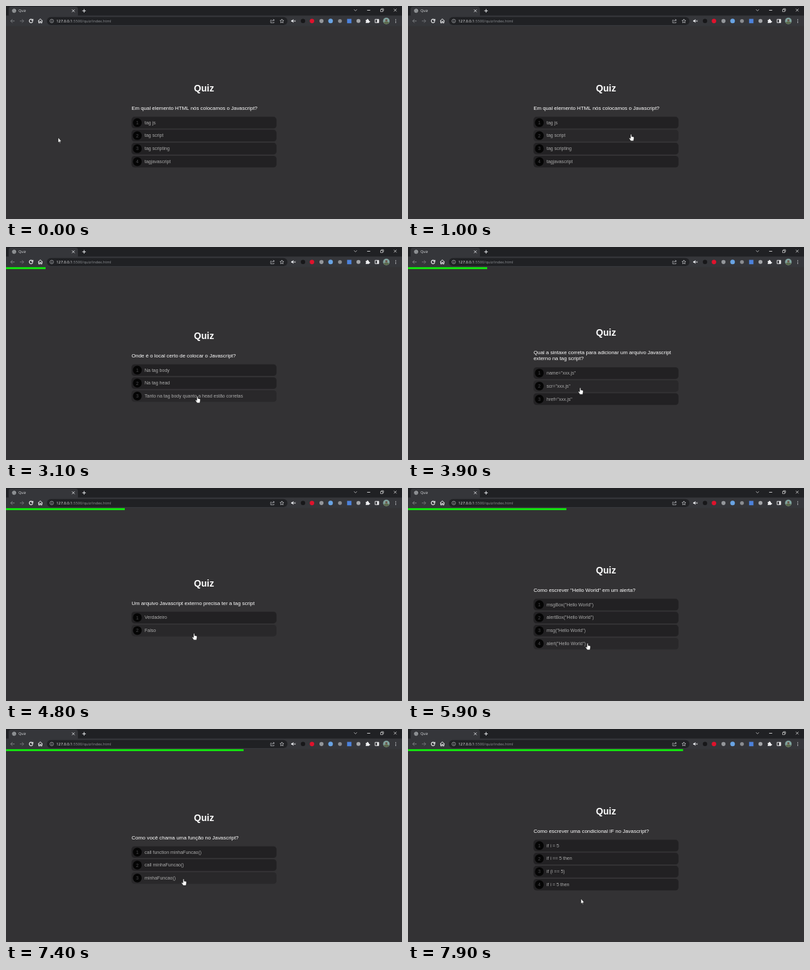
An HTML page with a canvas for the animation above (8 s loop, 600 by 324 pixels).

```html
<!DOCTYPE html>
<html lang="pt">
<head>
<meta charset="utf-8">
<title>Quiz</title>
<style>
html, body { margin: 0; width: 100%; height: 100%; overflow: hidden; background: #333234; }
canvas { display: block; width: 600px; height: 324px; }
</style>
</head>
<body>
<canvas id="stage" width="600" height="324"></canvas>
<script>
const ctx = document.getElementById('stage').getContext('2d');
const LOOP = 8000, STEP = 100, GROW = 500;
const SANS = '"Liberation Sans", Arial, sans-serif';
const UI = '"Open Sans", sans-serif';

const questions = [
  { at: 0, lines: ['Em qual elemento HTML nós colocamos o Javascript?'],
    options: ['tag js', 'tag script', 'tag scripting', 'tagjavascript'] },
  { at: 2000, lines: ['Onde é o local certo de colocar o Javascript?'],
    options: ['Na tag body', 'Na tag head', 'Tanto na tag body quanto a head estão corretas'] },
  { at: 3200, lines: ['Qual a sintaxe correta para adicionar um arquivo Javascript', 'externo na tag script?'],
    options: ['name="xxx.js"', 'scr="xxx.js"', 'href="xxx.js"'] },
  { at: 4100, lines: ['Um arquivo Javascript externo precisa ter a tag script'],
    options: ['Verdadeiro', 'Falso'] },
  { at: 5100, lines: ['Como escrever "Hello World" em um alerta?'],
    options: ['msgBox("Hello World")', 'alertBox("Hello World")', 'msg("Hello World")', 'alert("Hello World")'] },
  { at: 6100, lines: ['Como você cria uma função no Javascript?'],
    options: ['function:minhaFuncao()', 'function = minhaFuncao()', 'function minhaFuncao()'] },
  { at: 6800, lines: ['Como você chama uma função no Javascript?'],
    options: ['call function minhaFuncao()', 'call minhaFuncao()', 'minhaFuncao()'] },
  { at: 7540, lines: ['Como escrever uma condicional IF no Javascript?'],
    options: ['if i = 5', 'if i == 5 then', 'if (i == 5)', 'if i = 5 then'] }
];

// Pointer stops: time, x, y
const stops = [
  [0, 79, 200], [1000, 338, 195], [2000, 338, 196], [2500, 294, 205], [3000, 290, 226],
  [3200, 290, 228], [3400, 284, 250], [3900, 261, 214], [4080, 261, 215], [4300, 270, 242],
  [4800, 285, 221], [5100, 285, 222], [5400, 280, 268], [5900, 272, 236], [6100, 272, 237],
  [6300, 271, 257], [6700, 269, 226], [7540, 269, 228], [7900, 262, 258]
];

function pointerAt(t) {
  const i = stops.findIndex(s => s[0] > t);
  if (i < 0) return stops.at(-1).slice(1);
  const [t0, x0, y0] = stops[i - 1], [t1, x1, y1] = stops[i];
  const p = (t - t0) / (t1 - t0), k = p * p * (3 - 2 * p);
  return [x0 + (x1 - x0) * k, y0 + (y1 - y0) * k];
}

function rect(x, y, w, h, color, r = 0) {
  ctx.fillStyle = color;
  ctx.beginPath();
  ctx.roundRect(x, y, w, h, r);
  ctx.fill();
}

function disc(x, y, r, color) {
  rect(x - r, y - r, 2 * r, 2 * r, color, r);
}

function text(str, x, y, font, color, align = 'left') {
  ctx.font = font;
  ctx.fillStyle = color;
  ctx.textAlign = align;
  ctx.fillText(str, x, y);
}

function shape(d, x, y, stroke, fill, width = 0.9) {
  const path = new Path2D(d);
  ctx.save();
  ctx.translate(x, y);
  ctx.lineWidth = width;
  ctx.lineJoin = 'round';
  if (fill) { ctx.fillStyle = fill; ctx.fill(path); }
  if (stroke) { ctx.strokeStyle = stroke; ctx.stroke(path); }
  ctx.restore();
}

const CROSS = 'M-2-2L2 2M2-2L-2 2';
const RING = 'M-2.7 0a2.7 2.7 0 1 0 5.4 0a2.7 2.7 0 1 0-5.4 0';
const HOME = 'M-3.4 0L0-3.2L3.4 0M-2.4-.8V3H-.8V.6H.8V3H2.4V-.8';
const STAR = 'M0-3L.9-1L3-.8L1.4.6L1.9 2.8L0 1.6L-1.9 2.8L-1.4.6L-3-.8L-.9-1Z';
const SPEAKER = 'M-3.2-1H-1.8L.2-2.7V2.7L-1.8 1H-3.2Z';
const PUZZLE = 'M-3-1.6H-1.2A1.1 1.1 0 1 1 .9-1.6H2V.1A1.1 1.1 0 1 1 2 2V3H-3V1.8A1.1 1.1 0 0 0-3-.2Z';
const ARROW = 'M0 0V8L1.8 6.4L2.9 8.9L4 8.4L2.9 6H5.2Z';
const HAND = 'M-.9 .6Q0-.5.9.6V3.4L3.6 4Q4.7 4.4 4.5 5.8L3.8 10.2H-.5L-3 6.6Q-3.2 5.2-2 5.5L-.9 6.5Z';

function drawBrowser() {
  rect(0, 0, 600, 15, '#202124');
  rect(0, 14.5, 600, 16, '#35363a');
  rect(4, 1, 105, 16, '#35363a', 3.5);
  shape(RING, 12.3, 7.3, '#b8babd', '#6f7275', 0.7);
  shape('M-2 -1L0 0L-.5 2M.6-2L2 .4', 12.3, 7.3, '#c8cacd', null, 0.7);
  text('Quiz', 19, 9.4, '5.3px ' + UI, '#e4e5e8');
  shape(CROSS, 102, 7.3, '#dcdde0');
  shape('M-2.7 0H2.7M0-2.7V2.7', 118.3, 7.3, '#e8eaed', null, 1);
  shape('M-2.2-1L0 1.1L2.2-1', 529.5, 6.3, '#ccc', null, 0.8);
  shape('M-2.3 0H2.3', 549.5, 6.5, '#ddd', null, 0.9);
  shape('M-2.2-1H1.2V2.3H-2.2ZM-1-1V-2.2H2.3V1H1.2', 569.7, 6.3, '#ddd', null, 0.7);
  shape(CROSS, 589.7, 6.3, '#ddd', null, 0.8);

  shape('M3 0H-2.8M-.2-2.7L-2.9 0L-.2 2.7', 10, 22.8, '#85878b');
  shape('M-3 0H2.8M.2-2.7L2.9 0L.2 2.7', 24, 22.8, '#77797d');
  shape('M2-1.8A2.7 2.7 0 1 0 2.6.6M2.8-3V-.7H.5', 38, 22.8, '#f0f1f3', null, 1.1);
  shape(HOME, 52, 22.8, '#f0f1f3', null, 1);

  rect(62, 16.7, 364.5, 12.3, '#202124', 6.1);
  shape(RING, 69.3, 22.8, '#b5b7ba', null, 0.7);
  shape('M0-.3V1.5M0-1.5V-.9', 69.3, 22.8, '#b5b7ba', null, 0.8);
  const font = '5.75px ' + UI;
  text('127.0.0.1', 76.3, 25, font, '#f0f1f3');
  text(':5500/quiz/index.html', 76.3 + ctx.measureText('127.0.0.1').width, 25, font, '#8f9296');
  shape('M-1.6-1.4H-3V2.8H2V1.2M-1.3 1Q-1-1.4 2-1.4M.8-2.8L2.8-1.4L.8.2', 404, 22.8, '#bfc1c4', null, 0.7);
  shape(STAR, 418, 22.9, '#d0d2d5', null, 0.7);

  shape(SPEAKER, 435.3, 22.8, null, '#e8eaed');
  shape('M1.2-1.2L3.4 1.2M3.4-1.2L1.2 1.2', 435.3, 22.8, '#e8eaed', null, 0.7);
  disc(450, 22.8, 3.3, '#171719');
  disc(463.6, 22.8, 3.4, '#e0122c');
  disc(478, 22.8, 3.1, '#93969a');
  disc(491.8, 22.8, 3.5, '#69a4e4');
  disc(506, 22.8, 2.9, '#8b8d91');
  rect(516.8, 19.6, 6.6, 6.6, '#4c82dc');
  disc(534, 22.8, 3, '#a4a6a9');
  shape(PUZZLE, 548, 22.8, null, '#f0f1f3');
  shape('M-2.8-2.5H2.8V2.5H-2.8Z', 562, 22.8, '#f0f1f3', null, 0.9);
  rect(562.3, 20.3, 2.5, 5, '#f0f1f3');
  disc(576.3, 22.8, 5, '#7fa29d');
  shape('M-4.4 2.2Q0-.6 4.4 2.2Q2.5 5 0 5Q-2.5 5-4.4 2.2', 576.3, 22.8, null, '#5c6a4d');
  disc(576.3, 21.7, 1.7, '#6d5549');
  for (const dy of [-2.2, 0, 2.2]) disc(590.5, 22.8 + dy, 0.65, '#e0e1e4');
}

function drawQuiz(q, x, y) {
  const n = q.options.length, extra = q.lines.length - 1;
  const top = 125 + 9.85 * (4 - n) - 4.6 * extra;
  let over = false;
  text('Quiz', 300, top + 4.8, 'bold 14.05px ' + SANS, '#fff', 'center');
  q.lines.forEach((line, i) => text(line, 190.2, top + 32.8 + 9.2 * i, '7.9px ' + SANS, '#fff'));
  q.options.forEach((label, i) => {
    const mid = top + 52.4 + 9.2 * extra + 19.76 * i;
    const hover = x > 190 && x < 410 && Math.abs(y - mid) < 9.9;
    over ||= hover;
    rect(190.2, mid - 8.8, 219.6, 17.6, hover ? '#29282a' : '#222123', 4.4);
    disc(199, mid, 6.7, '#050505');
    text(i + 1, 199, mid + 2.5, '7.03px ' + SANS, '#4b4b4d', 'center');
    text(label, 210, mid + 2.3, '7.03px ' + SANS, '#aaa');
  });
  return over;
}

function draw(t) {
  const index = questions.findLastIndex(q => q.at <= t);
  const q = questions[index];
  const [x, y] = pointerAt(t);
  rect(0, 0, 600, 324, '#333234');
  drawBrowser();
  if (index) {
    const p = Math.min(1, (t - q.at) / GROW);
    rect(0, 30.8, 60 * (index - Math.pow(1 - p, 2.3)), 2.7, '#10f50c');
  }
  const over = drawQuiz(q, x, y);
  shape(over ? HAND : ARROW, x, y, '#111', '#fff', 0.6);
}

function tick() {
  draw(Math.floor(performance.now() % LOOP / STEP) * STEP);
  requestAnimationFrame(tick);
}
tick();
</script>
</body>
</html>
```
